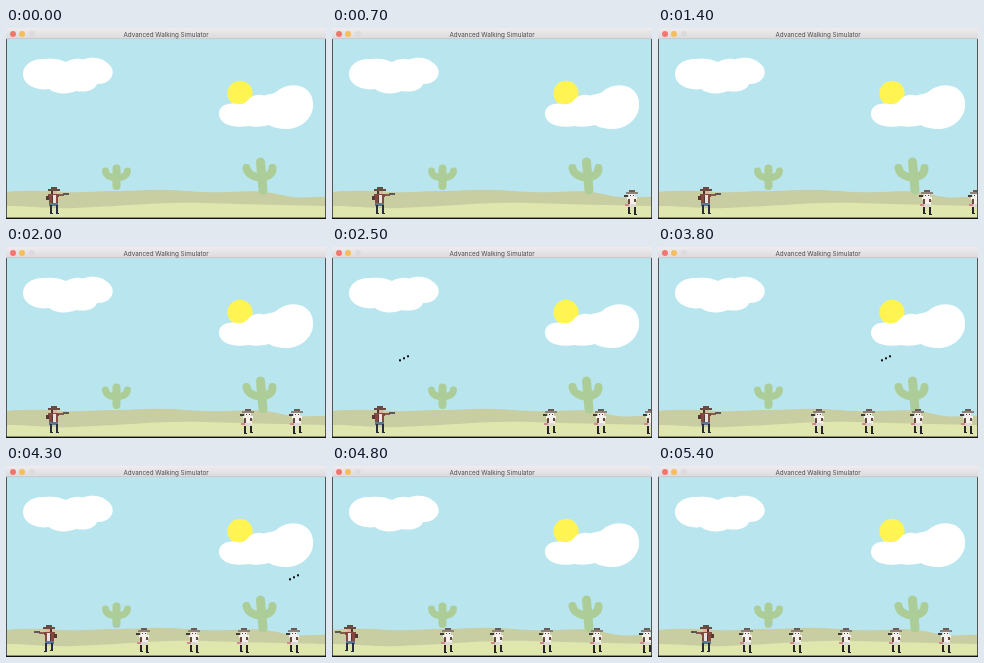
These frames come from a looping animation (320 px wide and 191 px high, 5.5 s). An HTML page:

```html
<!DOCTYPE html>
<html lang="en">
<head>
<meta charset="utf-8">
<title>Advanced Walking Simulator</title>
<style>
  html, body { margin: 0; width: 100%; height: 100%; overflow: hidden; background: #b9e6ee; }
  svg { display: block; width: 100vw; height: 100vh; }
  text { font: 6.3px Inter, sans-serif; fill: #4a4a4a; text-anchor: middle; }
  .px { shape-rendering: crispEdges; }
</style>
</head>
<body>
<svg viewBox="0 0 320 191" preserveAspectRatio="none">
  <defs>
    <linearGradient id="bar" x2="0" y2="1">
      <stop stop-color="#efecef"/><stop offset="1" stop-color="#dcd9dc"/>
    </linearGradient>
    <g id="heroBody">
      <path fill="#6a4a40" d="M-3 159h6v2h3v2h-12v-2h3z"/>
      <path fill="#d9b59d" d="M-2 163h5v3h-5z"/>
      <path fill="#4a3432" d="M-3 163h2v3h-2z"/>
      <path fill="#84483f" d="M-6 166h11v3h-1v6h-9v-6h-1z"/>
      <path fill="#e8e3e0" d="M-1 167h3v8h-3z"/>
      <path fill="#543634" d="M-8 168h3v4h-3zM-2 168h1v7h-1z"/>
      <path fill="#8a5a4c" d="M5 166h5v2h-5z"/>
      <path fill="#5d565b" d="M9 165h6v2h-6z"/>
      <path fill="#5b7693" d="M-5 175h9v3h-9z"/>
    </g>
    <g id="foeBody">
      <path fill="#6b5a55" d="M-3 161h6v2h-6z"/>
      <path fill="#8d8178" d="M-6 163h12v2h-12z"/>
      <path fill="#f4f1ed" d="M-3 165h6v3h-6z"/>
      <path fill="#453a3b" d="M-2 166h1v1h-1zM1 166h1v1h-1zM-8 166h4v2h-4z"/>
      <path fill="#f4f1ed" d="M-5 168h10v3h-1v5h-7v-5h-2z"/>
      <path fill="#69483f" d="M-4 170h2v5h-2zM2 170h2v3h-2z"/>
      <path fill="#d68795" d="M-7 175h4v2h-4z"/>
      <path fill="#ded8d5" d="M-3 175h6v3h-6z"/>
    </g>
  </defs>

  <rect width="320" height="191" fill="#b9e6ee"/>
  <circle cx="234" cy="65.3" r="12.6" fill="#fff451"/>
  <g fill="#fff">
    <path d="M17 46C17 37 26 30 39 31C47 30 54 31 60 34C66 31 72 30 77 31.5C84 29 94 29 100 34C107 38 109 46 104 51C101 55 96 56 91 56C89 62 80 65 70 63C61 67 49 66 43 61C31 63 17 57 17 46Z"/>
    <path d="M213 86C213 79 219 75 228 75.5C234 77 239 76 242 72C246 67 252 66 258 67.5C263 66 267 66 270 64C277 58 285 56 293 58C303 60 308 69 307 79C306 91 294 101 281 101C273 101 266 99 263 97C255 99 248 99 243 98C225 101 213 95 213 86Z"/>
  </g>
  <path fill="#c8cda2" d="M0 164C24 162 39 163 58 164S86 163 108 163S142 161 164 162S198 165 222 164S254 163 266 165S284 170 298 169.5S312 168.5 320 169V191H0Z"/>
  <g fill="none" stroke="#accd98" stroke-linecap="round" stroke-linejoin="round">
    <path stroke-width="8" d="M110.5 140.5V158"/>
    <path stroke-width="7" d="M99.5 143Q100 149 110 150M121.5 143Q121 149 111 150"/>
    <path stroke-width="9" d="M254.5 134L257 162"/>
    <path stroke-width="8" d="M240.5 140Q242 148 254 149.5M266.5 140Q267 147 257 149.5"/>
  </g>
  <path fill="#dfe7ae" d="M0 178C25 178 42 181 68 180S124 177 150 175.5S202 175 232 176S288 177 320 178V191H0Z"/>

  <g id="foes" class="px"></g>
  <g id="hero" class="px">
    <use href="#heroBody"/>
    <g id="heroLegs"></g>
  </g>
  <g id="shot" fill="#111">
    <rect x="-1" y="112.3" width="2" height="2"/>
    <rect x="3" y="110.3" width="2" height="2"/>
    <rect x="7" y="108.3" width="2" height="2"/>
  </g>

  <path fill="#555" d="M0 11h1v179h-1zM319 11h1v179h-1z"/>
  <rect y="189.6" width="320" height="1.4" fill="#111"/>
  <rect width="320" height="11" fill="url(#bar)"/>
  <rect y="10.5" width="320" height=".6" fill="#bcbcbf"/>
  <circle cx="7" cy="6" r="3" fill="#f4756d"/>
  <circle cx="16" cy="6" r="3" fill="#f6bd5c"/>
  <circle cx="26" cy="6" r="3" fill="#dcdadc"/>
  <text x="160" y="8.7">Advanced Walking Simulator</text>
</svg>
<script>
const LOOP = 5500, STEP = 100, GAP = 49.7;
const NS = 'http://www.w3.org/2000/svg';
const $ = id => document.getElementById(id);

function add(parent, tag, attrs) {
  const el = document.createElementNS(NS, tag);
  for (const k in attrs) el.setAttribute(k, attrs[k]);
  return parent.appendChild(el);
}

// Two legs with feet; the stride lifts one foot at a time.
function legs(top, stride) {
  const leg = (x, lift) => `M${x} ${top}h2v${185 - top - lift}h1v1h-3z`;
  return leg(-4, stride > 0 ? 1 : 0) + leg(2, stride < 0 ? 1 : 0);
}

const foes = Array.from({ length: 5 }, () => {
  const g = add($('foes'), 'g', {});
  add(g, 'use', { href: '#foeBody' });
  return { g, legs: add(g, 'path', { fill: '#282429' }) };
});
const heroLegs = add($('heroLegs'), 'path', { fill: '#292c3d' });

function heroX(t) {
  if (t < 4200) return 48;
  return t < 4800 ? 48 - (t - 4200) * 0.05 : 18 + (t - 4800) * 0.05;
}

function draw(t) {
  const stride = Math.floor(t / 200) % 2 ? 1 : -1;
  foes.forEach((foe, i) => {
    const x = 331.5 - t * 0.0449 + i * GAP;
    foe.g.setAttribute('transform', `translate(${x.toFixed(1)} 1)`);
    foe.legs.setAttribute('d', legs(178, stride));
  });

  const walking = t > 4200 && t < 5400;
  const face = t >= 4200 ? -1 : 1;
  $('hero').setAttribute('transform', `translate(${heroX(t)} 0) scale(${face} 1)`);
  heroLegs.setAttribute('d', legs(177, walking ? stride : 0));

  const shot = $('shot');
  shot.setAttribute('transform', `translate(${68 + (t - 2500) * 0.12} 0)`);
  shot.setAttribute('visibility', t >= 2400 && t < 4700 ? 'visible' : 'hidden');
}

const start = performance.now();
function tick(now) {
  const t = Math.max(0, now - start) % LOOP;
  draw(Math.floor(t / STEP) * STEP);
  requestAnimationFrame(tick);
}
draw(0);
requestAnimationFrame(tick);
</script>
</body>
</html>
```
